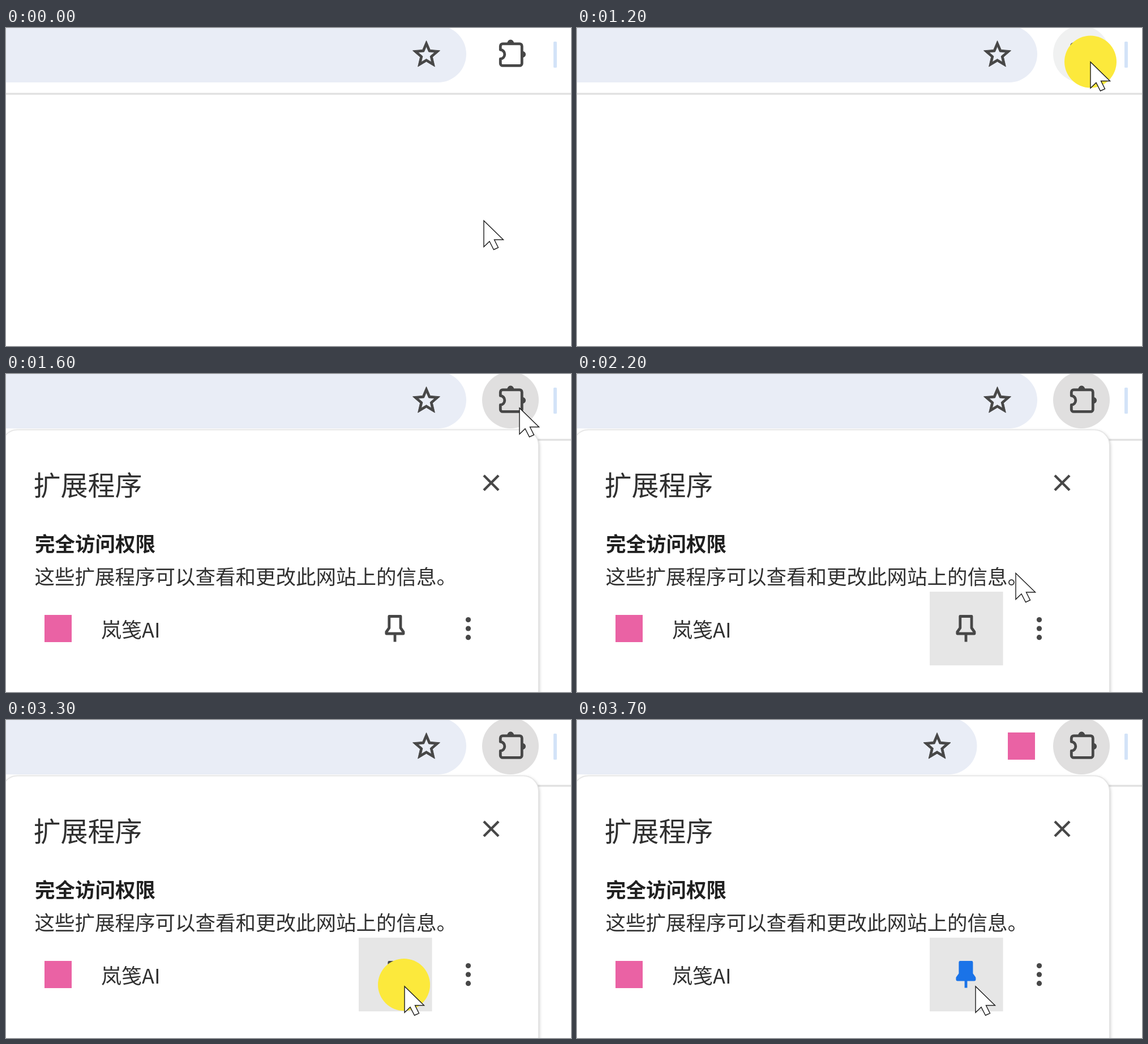
An HTML page that plays this animation: 998 by 561 pixels, repeating every 3900 ms.

```html
<!DOCTYPE html>
<html lang="zh-CN">
<head>
<meta charset="utf-8">
<title>扩展程序</title>
<style>
  html, body { margin: 0; width: 100%; height: 100%; overflow: hidden; background: #fff; }
  svg { display: block; width: 100%; height: 100%; }
  text { font: 350 35.5px "Noto Sans CJK SC", "Noto Sans CJK", sans-serif; fill: #303030; }
  .title { font-size: 48px; }
  .name { font-size: 36px; }
  .bold { font-weight: 700; fill: #202020; }
  .ink { fill: #474747; }
  .star { stroke: #474747; stroke-width: .4; }
  .line { fill: none; stroke: #474747; stroke-width: 4.8; stroke-linejoin: round; }
  .logo { fill: #ea62a4; }
  .sheet { fill: #fff; stroke: #e4e4e4; stroke-width: 1.5; filter: drop-shadow(1px 2px 2.5px rgba(0, 0, 0, .2)); }
  #pin.on path { stroke: #1a73e8; }
  #pin.on .body { fill: #1a73e8; }
</style>
</head>
<body>
<svg viewBox="0 0 998 561">
  <rect y="114.5" width="998" height="3.2" fill="#e0e0e0"/>
  <rect x="967" y="24" width="6" height="46" rx="1.5" fill="#d3e3f8"/>

  <g id="bar">
    <rect x="-200" y="-4" width="1013" height="100" rx="50" fill="#e9edf6"/>
    <path class="ink star" transform="translate(713.7 17.7) scale(2.4)" d="M22 9.24l-7.19-.62L12 2 9.19 8.63 2 9.24l5.46 4.73L5.82 21 12 17.27 18.18 21l-1.63-7.03L22 9.24zM12 15.4l-3.76 2.27 1-4.28-3.32-2.88 4.38-.38L12 6.1l1.71 4.04 4.38.38-3.32 2.88 1 4.28L12 15.4z"/>
  </g>
  <rect id="pinned" class="logo" x="761" y="22" width="48" height="48"/>

  <circle id="halo" cx="891" cy="46" r="50"/>
  <g transform="translate(.3 .4)">
    <path class="line" d="M877 27.5H907a4 4 0 0 1 4 4V62a4 4 0 0 1-4 4H877a4 4 0 0 1-4-4V54a7.5 8 0 0 0 0-16V31.5a4 4 0 0 1 4-4z"/>
    <path class="ink" d="M885 27a6 6.8 0 0 1 12 0zM911 40a6.8 6 0 0 1 0 12z"/>
  </g>

  <g id="panel">
    <rect class="sheet" x="-7" y="98.5" width="947.7" height="600" rx="27"/>
    <text class="title" x="48.5" y="213.8">扩展程序</text>
    <path class="line" style="stroke-width:4.4" d="M844 179L870 205M870 179L844 205"/>
    <text class="bold" x="51" y="313">完全访问权限</text>
    <text x="50.5" y="370.8">这些扩展程序可以查看和更改此网站上的信息。</text>
    <rect class="logo" x="68" y="425" width="48" height="48"/>
    <text class="name" x="168" y="465">岚笺AI</text>
    <rect id="pinHover" x="623" y="384" width="129.5" height="130" fill="#e6e6e6"/>
    <g id="pin">
      <path class="line body" d="M676.8 427.5H697V448L702 455V458H671.8V455L676.8 448Z"/>
      <path class="line" d="M687 458V472.5"/>
    </g>
    <g class="ink">
      <circle cx="816.5" cy="433.5" r="4.6"/>
      <circle cx="816.5" cy="449" r="4.6"/>
      <circle cx="816.5" cy="464.7" r="4.6"/>
    </g>
  </g>

  <circle id="click" fill="#fce93c"/>
  <path id="cursor" fill="#fff" stroke="#1c1c1c" stroke-width="1.4" d="M0 0V46L10 36.5 17.5 51 25.5 47.5 18.5 33.5H34.5Z"/>
</svg>
<script>
  const LOOP = 3900, STEP = 100;
  const get = id => document.getElementById(id);
  const [bar, pinned, halo, panel, pinHover, pin, click, cursor] =
    ['bar', 'pinned', 'halo', 'panel', 'pinHover', 'pin', 'click', 'cursor'].map(get);

  // Cursor waypoints: time, x, y
  const route = [
    [0, 844, 340], [100, 836, 328], [200, 834, 282], [300, 862, 202], [400, 889, 132],
    [500, 902, 88], [600, 906, 67], [800, 907, 60],
    [1700, 907, 60], [1800, 903, 74], [1900, 888, 118], [2100, 815, 275],
    [2300, 735, 428], [2400, 716, 456], [2600, 706, 468],
    [2800, 706, 468], [3000, 704, 470], [LOOP, 704, 470]
  ];
  const clicks = [{ at: 1200, x: 907, y: 59.5 }, { at: 3300, x: 703, y: 467 }];
  const ramp = (t, from, to) => Math.min(1, Math.max(0, (t - from) / (to - from)));
  const show = (node, alpha) => node.setAttribute('opacity', +alpha);

  function position(t) {
    const i = route.findIndex(p => p[0] > t);
    const [t0, x0, y0] = route[i - 1], [t1, x1, y1] = route[i];
    const k = ramp(t, t0, t1);
    return [x0 + (x1 - x0) * k, y0 + (y1 - y0) * k];
  }

  function drawClick(t) {
    const hit = clicks.find(c => t >= c.at && t < c.at + 300);
    show(click, hit ? 1 - ramp(t, hit.at, hit.at + 250) : 0);
    if (!hit) return;
    click.setAttribute('cx', hit.x);
    click.setAttribute('cy', hit.y);
    click.setAttribute('r', 46 + 34 * ramp(t, hit.at, hit.at + 200));
  }

  function render(t) {
    cursor.setAttribute('transform', `translate(${position(t)})`);
    drawClick(t);
    show(halo, t >= 500);
    halo.setAttribute('fill', t < 1400 ? '#f0f1f1' : '#e0dfdf');
    show(panel, ramp(t, 1300, 1500));
    show(pinHover, t >= 2200);
    pin.classList.toggle('on', t >= 3500);
    const slide = 1 - (1 - ramp(t, 3400, 3700)) ** 2;
    bar.setAttribute('transform', `translate(${-106.5 * slide})`);
    show(pinned, ramp(t, 3500, 3700));
  }

  function tick() {
    const t = performance.now() % LOOP;
    render(Math.floor(t / STEP) * STEP);
    requestAnimationFrame(tick);
  }
  tick();
</script>
</body>
</html>
```
